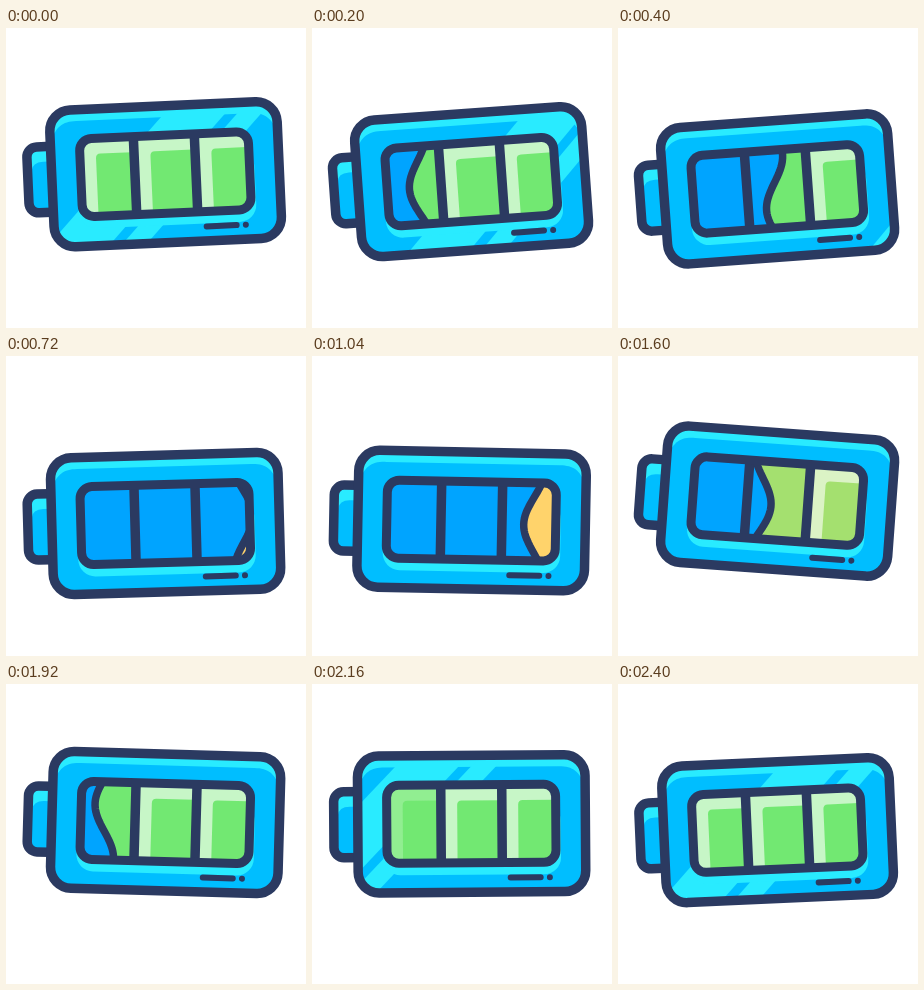
Animation of 300 by 300 pixels, one loop 2440 ms. Source, as an HTML page:

```html
<!DOCTYPE html>
<html lang="en">
<head>
<meta charset="utf-8">
<title>Battery</title>
<style>
html, body { margin: 0; width: 100%; height: 100%; overflow: hidden; background: #fff; }
svg { display: block; width: 100vw; height: 100vh; }
.line { fill: none; stroke: #2b3a61; stroke-width: 9.5; stroke-linecap: round; stroke-linejoin: round; }
.cyan { fill: #29ebff; }
.blue { fill: #00beff; }
</style>
</head>
<body>
<svg viewBox="0 0 300 300">
  <defs>
    <clipPath id="bodyClip"><rect x="-113" y="-68" width="226" height="136" rx="20"/></clipPath>
    <clipPath id="windowClip"><rect x="-84.5" y="-39" width="168" height="78" rx="12"/></clipPath>
    <clipPath id="capClip"><rect x="-138" y="-33" width="44" height="66" rx="10"/></clipPath>
  </defs>
  <g id="battery">
    <g clip-path="url(#capClip)">
      <rect class="cyan" x="-140" y="-35" width="50" height="70"/>
      <path class="blue" d="M-134-9Q-133-18-122-18H-90V40H-134Z"/>
    </g>
    <rect class="line" x="-138" y="-33" width="44" height="66" rx="10"/>

    <g clip-path="url(#bodyClip)">
      <rect class="cyan" x="-115" y="-70" width="230" height="140"/>
      <path class="blue" d="M-115-34C-108-52-102-57-87-57H87C102-57 108-52 115-34V75H-115Z"/>
      <g id="glint" class="cyan">
        <path d="M10-70H73.5L-61 70H-124.5Z"/>
        <path d="M86-70H111L-23.5 70H-48.5Z"/>
      </g>
      <rect class="cyan" x="-88.5" y="-20" width="177.5" height="71" rx="17"/>
    </g>
    <rect class="line" x="-114" y="-68.4" width="227.6" height="136.8" rx="21"/>

    <g clip-path="url(#windowClip)">
      <rect x="-86" y="-41" width="172" height="82" fill="#00a4ff"/>
      <path id="liquid"/>
      <g id="shine"></g>
      <path id="edge" class="line" style="stroke-width:7.5"/>
    </g>
    <path class="line" d="M-30.8-38V38M30.2-38V38"/>
    <rect class="line" x="-85" y="-39" width="169" height="78" rx="12" style="stroke-width:9"/>
    <path class="line" d="M38.5 54H68.5M77.7 54h.01" style="stroke-width:6"/>
  </g>
</svg>
<script>
const LOOP = 2440, CYCLE = 2400, TAU = Math.PI * 2, RAD = Math.PI / 180;
const GREEN = [114, 232, 114], YELLOW = [255, 211, 107];
const CELLS = [[-80.5, -35.5], [-26, 25.5], [35, 79.5]];
const $ = id => document.getElementById(id);
const clamp = v => Math.max(0, Math.min(1, v));
const mix = (a, b, k) => a.map((v, i) => Math.round(v + (b[i] - v) * k));
const rgb = c => `rgb(${c})`;

// Pale strip along the top and left of a full cell
const shines = CELLS.map(([l, r]) => {
  const p = document.createElementNS('http://www.w3.org/2000/svg', 'path');
  p.setAttribute('d', `M${l - 3} 40V-38H${r + 2}V-23.5H${l + 16}Q${l + 11.5}-23.5 ${l + 11.5}-19V40Z`);
  $('shine').append(p);
  return p;
});

function draw(t) {
  const lift = 153 - 14.7 * Math.cos(TAU * (t - 1985) / CYCLE);
  const a = TAU * (t - 310) / CYCLE;
  const tilt = -(4.05 * Math.cos(a) + 0.32 * Math.cos(3 * a));
  $('battery').setAttribute('transform', `translate(159.8 ${lift}) rotate(${tilt})`);

  const u = t > CYCLE / 2 ? t - CYCLE : t;
  $('glint').setAttribute('transform', `translate(${0.0013 * u * Math.abs(u)} 0)`);

  // Level drains to the right, then refills from the right
  const drain = t < 800;
  const base = drain ? -103 + 0.25 * t : 28.5 - 0.14 * (t - 1280);
  const phase = drain ? 202 - 0.29 * (t - 400) : 180 - 0.335 * (t - 1280);
  let wave = '';
  for (let y = -42; y <= 42; y += 3) {
    const x = base + 10 * Math.sin((112 * y / 34 + phase) * RAD);
    wave += `${wave ? 'L' : 'M'}${x.toFixed(2)} ${y}`;
  }
  $('edge').setAttribute('d', wave);
  $('liquid').setAttribute('d', wave + 'L130 42V-42Z');

  const color = drain
    ? mix(GREEN, YELLOW, clamp((t - 480) / 240))
    : mix(YELLOW, GREEN, clamp((t - 1280) / 500));
  $('liquid').setAttribute('fill', rgb(color));
  shines.forEach((s, i) => {
    s.setAttribute('fill', rgb(mix(color, [255, 255, 255], 0.6)));
    s.setAttribute('opacity', clamp((CELLS[i][0] - base - 10) / 12));
  });
}

// The closing pose rests briefly before the loop restarts
function tick() {
  draw(Math.min(performance.now() % LOOP, CYCLE));
  requestAnimationFrame(tick);
}
tick();
</script>
</body>
</html>
```
